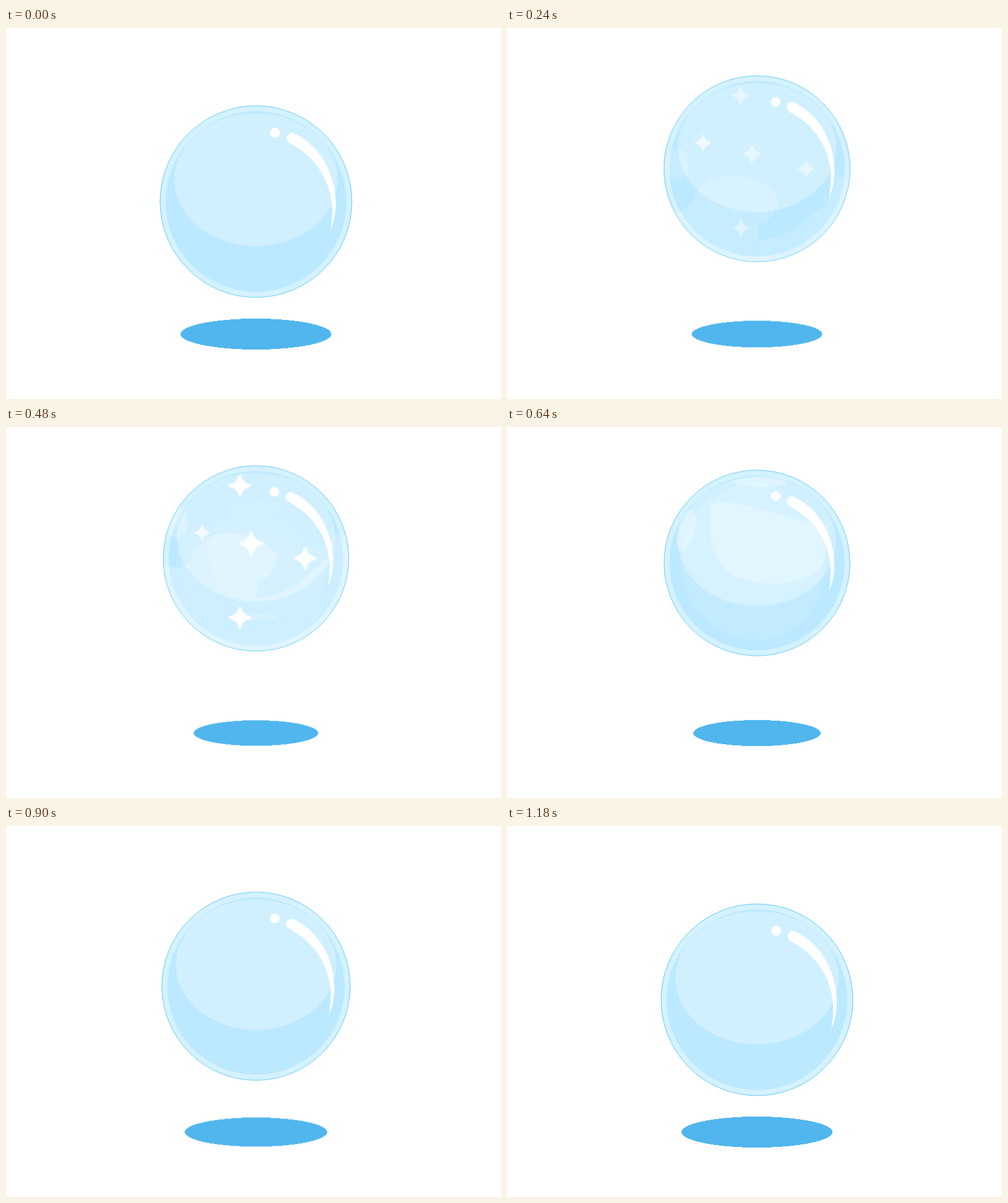
Recreate the animation shown at these times as an HTML page. Size 800 px wide and 600 px high, loop 1200 ms.

```html
<!DOCTYPE html>
<html lang="en">
<head>
<meta charset="utf-8">
<title>Floating bubble</title>
<style>
  html, body { margin: 0; width: 100%; height: 100%; overflow: hidden; background: #fff; }
  svg { display: block; width: 100%; height: 100%; }

  .lift, .swell, .shadow, .rise, .settle, .star { animation: 1.2s linear infinite; }
  .lift { animation-name: lift; }
  .swell { animation-name: swell; }
  .shadow { animation-name: shadow; }
  .rise { animation-name: rise; opacity: 0; }
  .settle { animation-name: settle; opacity: 0; }
  .star { animation-name: twinkle; animation-delay: var(--wait, 35ms); opacity: 0; }

  /* quick rise, short hang, softer fall, rest */
  @keyframes lift {
    0% { transform: translateY(281px); animation-timing-function: cubic-bezier(.333, .667, .667, 1); }
    37.92%, 39.58% { transform: translateY(212.5px); animation-timing-function: cubic-bezier(.5, 0, .78, 1); }
    89.17%, 100% { transform: translateY(281px); }
  }
  @keyframes shadow {
    0% { transform: scale(1); animation-timing-function: cubic-bezier(.333, .667, .667, 1); }
    37.92%, 39.58% { transform: scale(.825); animation-timing-function: cubic-bezier(.5, 0, .78, 1); }
    89.17%, 100% { transform: scale(1); }
  }
  @keyframes swell {
    0% { transform: scale(1); animation-timing-function: cubic-bezier(.333, 1, .667, 1); }
    37.92%, 39.58% { transform: scale(.967); animation-timing-function: cubic-bezier(.7, 0, .9, .9); }
    89.17%, 100% { transform: scale(1); }
  }

  /* reflections sweep upwards through the ball */
  @keyframes rise {
    0%, 15% { opacity: 0; transform: translateY(25px); }
    27% { opacity: 1; }
    28.33% { transform: translateY(0); }
    36% { opacity: 1; }
    47%, 100% { opacity: 0; transform: translateY(-60px); }
  }
  @keyframes settle {
    0%, 37% { opacity: 0; transform: translateY(60px); }
    48% { opacity: 1; }
    53.33% { opacity: 1; transform: translateY(0); }
    63.5%, 100% { opacity: 0; transform: translateY(-20px); }
  }
  @keyframes twinkle {
    0%, 10% { opacity: 0; transform: scale(.5); }
    25%, 37% { opacity: 1; transform: scale(1); }
    46%, 100% { opacity: 0; transform: scale(.5); }
  }
</style>
</head>
<body>
<svg viewBox="0 0 800 600">
  <defs>
    <clipPath id="ball"><circle r="154.5"/></clipPath>
    <path id="spark" fill="#fff" stroke="#fff" stroke-width=".22" stroke-linejoin="round"
      d="M0-.88C.14-.38 .38-.14 .88 0C.38 .14 .14 .38 0 .88C-.14 .38-.38 .14-.88 0C-.38-.14-.14-.38 0-.88Z"/>
  </defs>

  <g transform="translate(404 495)">
    <ellipse class="shadow" rx="122" ry="25" fill="#50b6ed" shape-rendering="crispEdges"/>
  </g>

  <g transform="translate(404 0)"><g class="lift"><g class="swell">
    <circle r="155" fill="#d4f2ff" stroke="#62c8f3"/>
    <circle r="146" fill="#bbe9ff"/>
    <ellipse cy="-35.5" rx="132" ry="107.5" fill="#d1f0ff"/>

    <g clip-path="url(#ball)" fill="#fff">
      <g class="rise">
        <ellipse cx="-133" cy="-23" rx="19" ry="27" opacity=".4"/>
        <path opacity=".4" d="M-160 48L-125 55C-118 42-105 48-104 28C-90 0-60-4-40-4C-10-4 22 10 35 34
          C34 60 20 72 2 74Q4 95 0 104C40 102 80 78 95 56C115 48 122 30 126 4Q132-8 146-2L160 0V230H-160Z"/>
        <ellipse cx="-5" cy="135" rx="40" ry="6" opacity=".4"/>
      </g>
      <g class="settle">
        <path opacity=".12" d="M-128-10C-125 80-70 128 0 128C50 128 105 90 112 20C118-60 70-125 0-135C-80-130-125-70-128-10Z"/>
        <path opacity=".3" d="M-79-90Q-76-104-60-102C0-98 60-70 118-62Q118-30 112 0
          C100 25 60 36 20 35C-30 33-66 12-74-25Q-80-50-79-90Z"/>
        <ellipse rx="14" ry="34" transform="translate(-118 -55) rotate(15)" opacity=".3"/>
        <ellipse cx="5" cy="-136" rx="45" ry="9" opacity=".3"/>
      </g>
    </g>

    <g transform="translate(-90 -43) scale(16.5)"><use class="star" href="#spark" style="--wait: 0ms"/></g>
    <g transform="translate(-27 -122) scale(19)"><use class="star" href="#spark"/></g>
    <g transform="translate(-8 -25) scale(21)"><use class="star" href="#spark"/></g>
    <g transform="translate(82 0) scale(19)"><use class="star" href="#spark"/></g>
    <g transform="translate(-27 99) scale(19)"><use class="star" href="#spark"/></g>

    <g fill="#fff">
      <circle cx="31" cy="-111.5" r="8"/>
      <path d="M62-110C104-91 129-43 129 3C129 19 126 35 120 47C123 33 123 19 123 9
        C122-19 108-67 54-95A8.3 8.3 0 0 1 62-110Z"/>
    </g>
  </g></g></g>
</svg>
</body>
</html>
```
